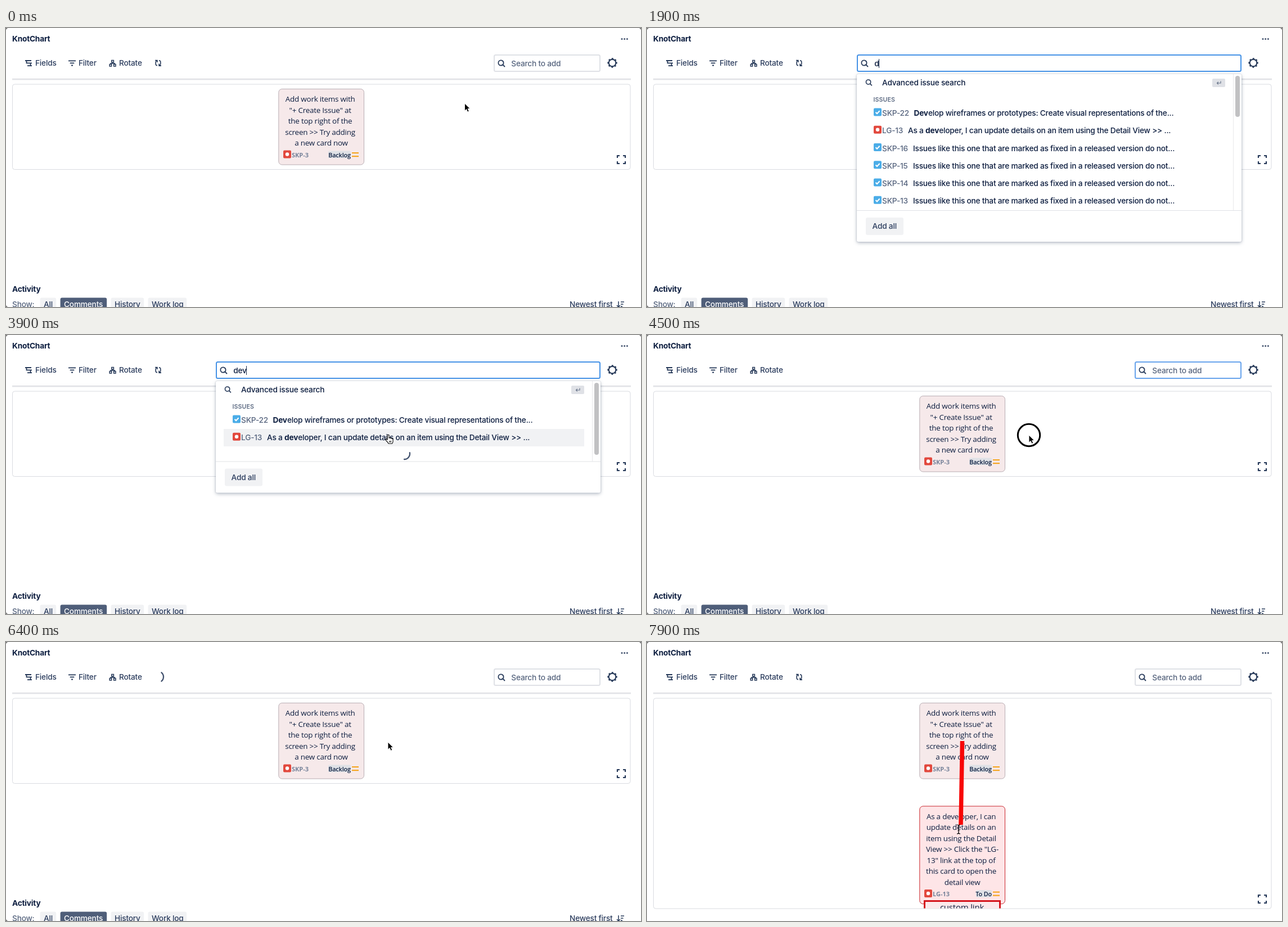
An HTML page that plays this animation: 1129 by 496 pixels, repeating every 8 s.

```html
<!DOCTYPE html>
<html lang="en">
<head>
<meta charset="utf-8">
<title>Issue graph</title>
<style>
  html, body { margin: 0; width: 100%; height: 100%; overflow: hidden; background: #fff; }
  svg { display: block; width: 100%; height: 100%; }
  text { font: 450 13.7px Inter, sans-serif; letter-spacing: -.21px; fill: #0c1d3f; white-space: pre; }
  .mid { font-weight: 500; fill: #2c3d5e; }
  .bold, tspan.bold { font-weight: 650; }
  .soft { fill: #56647e; }
  .label { font-size: 10.6px; font-weight: 600; letter-spacing: .1px; fill: #5e6c84; }
  .card text { font: 500 13.4px "Open Sans", sans-serif; letter-spacing: -.2px; text-anchor: middle; }
  .card .key { font-size: 11px; font-weight: 700; text-anchor: start; letter-spacing: 0; fill: #77839a; }
  .card .status { font-size: 10.8px; font-weight: 600; text-anchor: end; letter-spacing: -.1px; }
  .line { fill: none; stroke: #253858; stroke-width: 1.8; }
</style>
</head>
<body>
<svg id="stage" viewBox="0 0 1129 496" preserveAspectRatio="none"></svg>
<script>
const LOOP = 8000, STEP = 100;
const at = (x, y, body, id = '') => `<g ${id && `id="${id}"`} transform="translate(${x} ${y})">${body}</g>`;
const group = (id, body) => `<g id="${id}">${body}</g>`;
const text = (x, y, s, cls = '') => `<text x="${x}" y="${y}" class="${cls}">${s}</text>`;
const rect = (x, y, w, h, fill, more = '') => `<rect x="${x}" y="${y}" width="${w}" height="${h}" fill="${fill}" ${more}/>`;
const line = (d, more = '') => `<path class="line" d="${d}" ${more}/>`;

const lens = '<circle class="line" r="4.6" cx="-1" cy="-1"/>' + line('M2.4 2.4L6 6');
const task = rect(0, 0, 14, 14, '#4bade8', 'rx="2"') +
  '<path d="M3.6 7.2l2.4 2.5 4.6-5" fill="none" stroke="#fff" stroke-width="2"/>';
const bug = rect(0, 0, 14, 14, '#e2483d', 'rx="2"') + '<circle cx="7" cy="7" r="3.2" fill="#fff"/>';
const arc = '<path d="M6.43 -7.66A10 10 0 0 1 6.43 7.66" fill="none" stroke="#42526e" stroke-width="2.3" stroke-linecap="round"/>';

function card(id, y, h, lines, key, status, statusW) {
  const foot = y + h - 14;
  const words = lines.map((s, i) =>
    text(i === lines.length - 1 || s.endsWith('-') ? 560.5 : 558.6, y + 23 + 19.5 * i, s)).join('');
  return `<g id="${id}" class="card">` +
    rect(484.8, y + .4, 151.7, h - .8, '#f6e9ea', 'rx="6" stroke="#b9adb3" class="face"') + words +
    at(493, foot - 12, bug) + text(508, foot + .3, key, 'key') +
    rect(613 - statusW, foot - 11, statusW, 13, '#dfe1e6', 'rx="2"') + text(613, foot, status, 'status') +
    rect(615, foot - 8.5, 12, 2.2, '#f5a623') + rect(615, foot - 2.5, 12, 2.2, '#f5a623') + '</g>';
}

function row(i, icon, key, x, title) {
  const y = 156.2 + 31.25 * i;
  return at(403, y - 13.7, icon) + text(418, y, key, 'soft') + text(x, y, title);
}

const stale = 'Issues like this one that are marked as fixed in a released version do not...';
const header =
  text(11, 24, 'KnotChart', 'bold') +
  [1095, 1099.7, 1104.4].map(x => `<circle cx="${x}" cy="19.5" r="1.5" fill="#42526e"/>`).join('') +
  line('M34 58H45M38 62.3H46M38 67.2H46M36.5 58V62.3H40M43.5 62.3V67') +
  text(52, 67, 'Fields', 'mid') +
  line('M111 58.3H124M113.7 62.4H121.3M116 66.5H119', 'stroke-width="1.6"') +
  text(129, 67, 'Filter', 'mid') +
  line('M187.8 57.4h3.6v3.6h-3.6zM184.2 64.6h3.4v3.4h-3.4zM191.6 64.6h3.4v3.4h-3.4zM189.6 61v2M186 64.4V63h7.3v1.4', 'style="stroke-width:1.5"') +
  text(201, 67, 'Rotate', 'mid') +
  at(270.5, 62.3, line('M-1.5 4.5H-2A3 3 0 0 1-4.3 1.5V-1.5A3.3 3.3 0 0 1-2-4.5M-5.4-4.8H-1.6V-1.2M1.5-4.5H2A3 3 0 0 1 4.3-1.5V1.5A3.3 3.3 0 0 1 2 4.5M5.4 4.8H1.6V1.2', 'style="stroke-width:1.6"'), 'refresh') +
  at(270, 62, arc, 'busy') +
  at(1078, 62, '<circle class="line" r="6.3" style="stroke-width:2"/><circle class="line" r="7.8" stroke-dasharray="3 3.13" transform="rotate(-11)"/>') +
  rect(11, 90, 1100, 1.6, '#d5d7dc') + rect(11, 91.6, 1100, 1.4, '#f0f1f3');

const tab = (x, w, s, on) => rect(x - .4, 479.4, w + .6, 26, on ? '#4f5e79' : '#f1f2f4', 'rx="3"') +
  `<text x="${x + 6}" y="496" class="mid" ${on ? 'style="fill:#fff"' : ''}>${s}</text>`;
const activity =
  text(11, 469, 'Activity', 'bold') + text(11, 496, 'Show:', 'soft') +
  tab(61, 28, 'All') + tab(97, 82, 'Comments', true) + tab(187, 58, 'History') + tab(253, 68, 'Work log') +
  text(1002, 496, 'Newest first', 'mid') +
  line('M1089 486V496M1086 493l3 3 3-3M1093 487H1099M1093 491H1097.5M1093 495H1096', 'style="stroke-width:1.5"');

const board =
  rect(11.5, 100, 1098.5, 151.5, '#fff', 'rx="4" stroke="#d9dbe0" id="frame"') +
  card('first', 108, 135.5, ['Add work items with', '"+ Create Issue" at', 'the top right of the',
    'screen &gt;&gt; Try adding', 'a new card now'], 'SKP-3', 'Backlog', 40) +
  card('second', 291.5, 174.5, ['As a developer, I can', 'update details on an', 'item using the Detail',
    'View &gt;&gt; Click the "LG-', '13" link at the top of', 'this card to open the', 'detail view'], 'LG-13', 'To Do', 28) +
  '<clipPath id="inside"><rect x="12" y="100" width="1098" height="373.5"/></clipPath>' +
  `<g id="linkName" class="card" clip-path="url(#inside)">${rect(493.5, 460.5, 134, 30, '#fce8ea', 'stroke="#d4141c" stroke-width="3"')}
    <text x="560" y="476.5" style="font-size:15px">custom link</text></g>` +
  '<path id="link" fill="none" stroke="#f80505" stroke-width="7.5"/>' +
  at(1094, 234, line('M-7-3V-7H-3M3-7H7V-3M7 3V7H3M-3 7H-7V3', 'style="stroke-width:2.2"'), 'full');

const search =
  rect(868, 48, 188, 29, '#fff', 'rx="2.5" stroke-width="2" id="field"') +
  at(881, 63, lens, 'lens') +
  '<text id="query" y="68"></text>' + rect(404, 55, 1, 16, '#172b4d', 'id="caret"');

const popup =
  rect(373, 82, 684, 298, '#fff', 'rx="3" id="sheet" style="filter:drop-shadow(0 2px 3px #091e4240) drop-shadow(0 0 1px #091e4238)"') +
  rect(387, 167, 641, 31, '#f1f2f4', 'id="hover"') +
  at(394.5, 97, `<g transform="scale(.9)">${lens}</g>`) + text(418, 102.2, 'Advanced issue search') +
  rect(1005, 90, 23, 15, '#dfe1e6', 'rx="2"') +
  line('M1020 94.5V98H1013.5M1015.8 95.8L1013.5 98l2.3 2.2', 'style="stroke-width:1.2;stroke:#6b778c"') +
  text(402.5, 131, 'ISSUES', 'label') +
  row(0, task, 'SKP-22', 474.5, '<tspan class="bold">Dev</tspan>elop wireframes or prototypes: Create visual representations of the...') +
  row(1, bug, 'LG-13', 464, 'As a <tspan class="bold">dev</tspan>eloper, I can update details on an item using the Detail View &gt;&gt; ...') +
  group('more', [16, 15, 14, 13].map((n, i) => row(i + 2, task, 'SKP-' + n, 473, stale)).join('')) +
  at(708, 211, arc, 'loading') +
  rect(1042, 82, 1, 242, '#e8e8ea', 'id="track"') + rect(1046, 85, 8, 73, '#c1c1c3', 'rx="4" id="thumb"') +
  group('foot', rect(373, 324, 684, 1, '#dfe1e6') + rect(389, 337, 67, 31, '#f1f2f4', 'rx="3"') + text(400.5, 357.3, 'Add all', 'mid'));

const pointer =
  '<circle id="ring" r="20" fill="none" stroke="#000" stroke-width="3"/>' +
  '<path id="arrow" d="M0 0V13.2L3.1 10.4 5.2 15.2 7.7 14.1 5.6 9.5H9.6Z" fill="#000" stroke="#fff" stroke-width=".9"/>' +
  '<path id="beam" d="M-3-8Q0-8 0-6V6Q0 8-3 8M3-8Q0-8 0-6M0 6Q0 8 3 8M-1.5 2.5H1.5" fill="none" stroke="#000" stroke-width="1.2"/>' +
  '<path id="hand" d="M-1 8V1Q-1-.8 .5-.8T2 1V5Q3.5 4 4.6 5.4 6 4.8 7 6.2 9 5.8 9 8V11Q9 13 7.6 15H1Q0 12.5-2.5 10.5-5 8-3.5 7.2-2.3 6.8-1 8ZM3 10V13M5.2 10V13" fill="#fff" stroke="#000" stroke-width="1.1"/>';

const svg = document.getElementById('stage');
svg.innerHTML = header + group('activity', activity) + board + search + group('popup', popup) +
  at(0, 0, pointer, 'mouse') + '<path d="M0 0H3L0 3ZM1129 0H1126L1129 3Z" fill="#777"/>' +
  '<path id="corners" d="M0 496H3L0 493Z" fill="#777"/>';

const el = {};
svg.querySelectorAll('[id]').forEach(n => el[n.id] = n);
const set = (n, attrs) => { for (const k in attrs) n.setAttribute(k, attrs[k]); };
const show = (id, on) => { el[id].style.display = on ? '' : 'none'; };
const move = (id, x, y, turn = 0) => set(el[id], { transform: `translate(${x} ${y}) rotate(${turn})` });
const within = (t, a, b) => t >= a && t < b;

// time, x, y of the mouse
const path = [[0, 815.5, 134], [100, 815.5, 134], [700, 928, 62], [2800, 928, 62], [3400, 679, 178],
  [6900, 679, 178], [7100, 561, 177], [7200, 561, 177], [7400, 560, 197], [7500, 560, 197], [7900, 554, 333]];

function mouseAt(t) {
  const i = path.findIndex(p => p[0] > t);
  if (i < 0) return path[path.length - 1].slice(1);
  const [a, b] = [path[i - 1], path[i]];
  const u = (t - a[0]) / (b[0] - a[0]), e = u * u * (3 - 2 * u);
  return [a[1] + (b[1] - a[1]) * e, a[2] + (b[2] - a[2]) * e];
}

const turnAt = (t, zero) => 360 * (t - zero) / 860;

function draw(t) {
  const open = within(t, 1000, 4500), loading = within(t, 2100, 4000), grown = t >= 6700;
  const [mx, my] = mouseAt(t);

  // search field
  const left = open ? 373 : 867;
  const typed = open ? 'dev'.slice(0, Math.max(0, Math.floor((t - 1800) / 100))) : '';
  const inField = mx > left && mx < 1057 && my > 47 && my < 78;
  const border = within(t, 1000, 1200) ? '#8fb0e3' : open ? '#4592e6' : within(t, 4500, 4600) ? '#67a3ec' : '#dfe1e6';
  set(el.field, { x: left + 1, width: 1055 - left, stroke: border, fill: inField && t < 1200 ? '#f4f5f7' : '#fff' });
  move('lens', left + 14, 63);
  set(el.query, { x: left + 31.3, class: typed ? '' : 'soft' });
  el.query.textContent = typed || 'Search to add';
  const blink = t < 1900 ? (t - 1000) % 1200 < 600 : t < 2200 || (t - 2200) % 1200 < 600;
  show('caret', open && blink);
  set(el.caret, { x: 404 + [0, 8, 15.7, 23][typed.length] });

  // result list
  const lift = loading ? -99.5 : 0;
  const turn = 90 + turnAt(t, 2300);
  show('popup', open);
  show('more', !loading);
  show('loading', loading);
  move('loading', 708, 211, turn);
  set(el.sheet, { height: 298 + lift });
  set(el.track, { height: 242 + lift });
  move('foot', 0, lift);
  set(el.thumb, { height: loading ? 134 - 6 * Math.abs(Math.sin(turn * Math.PI / 90)) : 73 });
  const rowIndex = Math.floor((my - 135.8) / 31.25);
  const onRow = open && t >= 2800 && rowIndex >= 0 && rowIndex < 2 && mx < 1028;
  show('hover', onRow);
  set(el.hover, { y: 135.8 + 31.25 * rowIndex });

  // board
  show('refresh', !within(t, 4500, 6700));
  show('busy', within(t, 4600, 6700));
  move('busy', 270, 62, turnAt(t, 6400));
  show('activity', !grown);
  show('corners', !grown);
  show('second', grown);
  set(el.frame, { height: grown ? 374 : 151.5 });
  move('full', 1094, grown ? 457 : 234);
  const target = t >= 7800;
  set(el.second.querySelector('.face'), { fill: target ? '#fee5e7' : '#f6e9ea', stroke: target ? '#c9252d' : '#b9adb3' });
  show('linkName', target);
  show('link', t >= 7300);
  set(el.link, { d: `M560.5 176L${mx + 4} ${Math.max(177, my - 8)}` });

  // mouse
  const onCard = !open && mx > 485 && mx < 637 && my > 108;
  const shape = onRow ? 'hand' : inField || onCard ? 'beam' : 'arrow';
  ['arrow', 'beam', 'hand'].forEach(s => show(s, s === shape));
  show('mouse', !within(t, 1900, 2800));
  move('mouse', mx, my);
  const age = t - (t < 2000 ? 800 : 4400);
  show('ring', within(age, 0, 200));
  set(el.ring, { r: age < 100 ? 15 : 19.7 });
}

const start = performance.now();
function tick() {
  const t = (performance.now() - start) % LOOP;
  draw(Math.floor(t / STEP) * STEP);
  requestAnimationFrame(tick);
}
tick();
</script>
</body>
</html>
```
